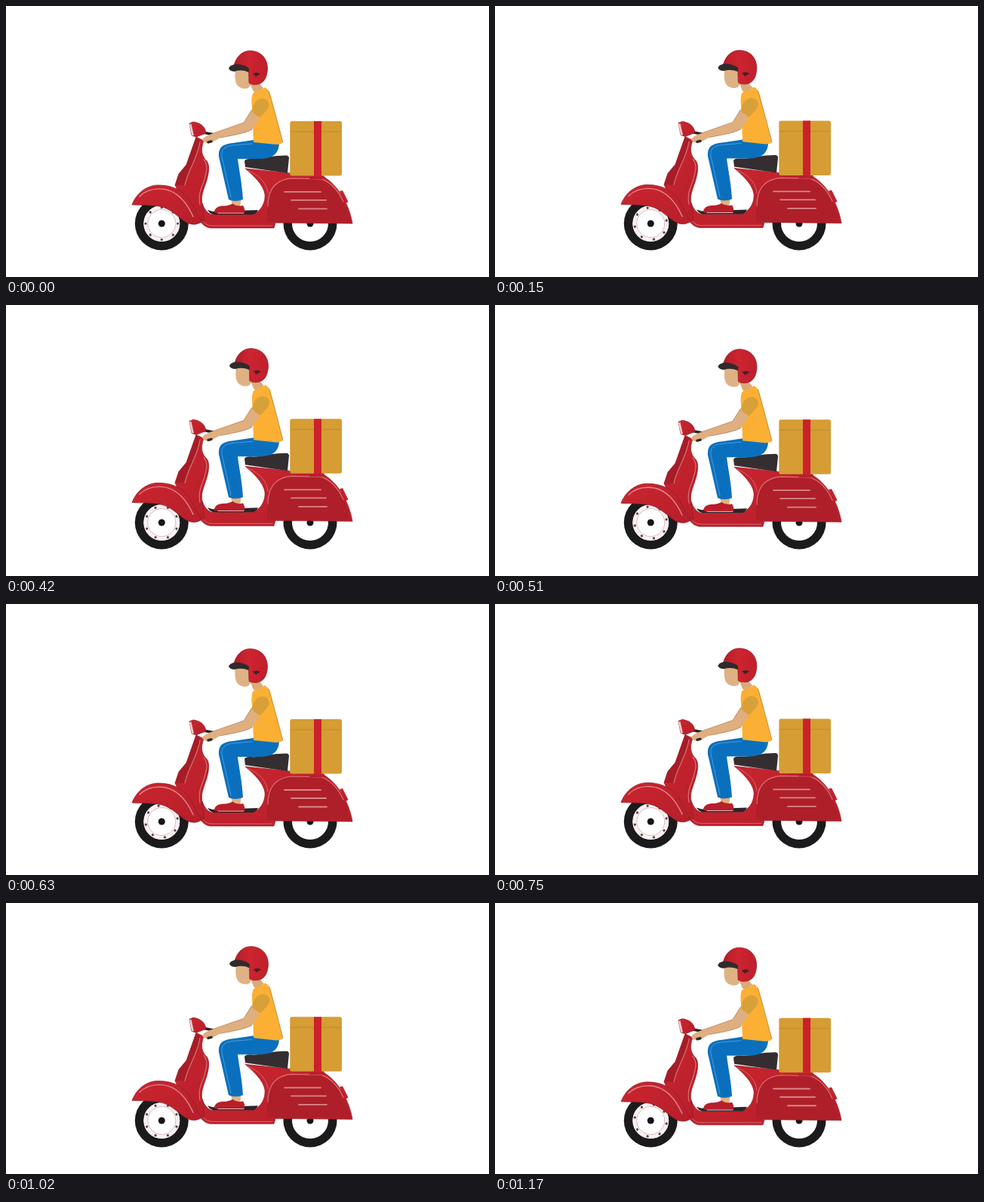
Write an HTML page that moves like this. It is 640 by 360 pixels and loops after 1200 ms.

```html
<!DOCTYPE html>
<html lang="en">
<head>
<meta charset="utf-8">
<title>Scooter delivery</title>
<style>
  html, body { margin: 0; width: 100%; height: 100%; overflow: hidden; background: #fff; }
  svg { display: block; width: 640px; height: 360px; }
  .line { fill: none; stroke-linecap: round; stroke-linejoin: round; }
  .edge { stroke: #8f1c26; stroke-width: .7; stroke-linejoin: round; }
</style>
</head>
<body>
<svg viewBox="0 0 640 360">
  <defs>
    <linearGradient id="red" x1="0" y1="0" x2="1" y2="1">
      <stop offset="0" stop-color="#ca252f"/>
      <stop offset="1" stop-color="#b61f2a"/>
    </linearGradient>
    <linearGradient id="helmet" x1="0" y1="0" x2="1" y2="0">
      <stop offset="0" stop-color="#b51d28"/>
      <stop offset=".45" stop-color="#cd2430"/>
      <stop offset="1" stop-color="#bf1f2b"/>
    </linearGradient>
    <g id="tyre">
      <circle r="35.5" fill="#1b1b1d"/>
      <circle r="24" fill="#fff"/>
      <circle r="4.5" fill="#151517"/>
    </g>
  </defs>

  <g transform="translate(206.3 289)">
    <use href="#tyre"/>
    <circle r="21.2" fill="none" stroke="#f9f0f1" stroke-width="5"/>
    <circle r="18.5" fill="none" stroke="#d3aaad" stroke-width=".8"/>
    <g class="dots" fill="#5a4548"></g>
  </g>
  <use href="#tyre" x="403" y="289"/>

  <g id="bike">
    <!-- rear light, cowl and floor -->
    <path fill="#c2222c" d="M442 246L446 245L453.5 260L450.5 262Z"/>
    <path class="edge" fill="url(#red)" d="M317 216L375 222L421 227C440 238 455 264 459 289L357 288L355 295L271 295C262 294 257 287 253 278L260 262Q264 274 272 277L326 277C339 273 344 260 343 250C341 238 330 227 317 216Z"/>
    <path fill="#ae1f29" d="M346 287C346 266 346 254 350 246C356 234 367 229 380 229L418 230C436 236 449 258 456 287Z"/>
    <path class="line" stroke="#df7077" stroke-width="1.2" d="M347 266C347 242 358 231 378 229L418 230C432 235 441 247 447 260"/>
    <path class="line" stroke="#d6666d" stroke-width="1" d="M321 219C337 225 346 237 347 249M262 287Q265 292 274 292L353 292"/>
    <path class="line" stroke="#d9878b" stroke-width="1.8" d="M369 247H417M378 258H424M388 269.5H425"/>
    <path fill="#2b2527" d="M267 271L274 273L334 271Q331 277 326 277L275 277Q270 276 267 271Z"/>

    <!-- leg shield and steering column -->
    <path class="edge" fill="url(#red)" d="M252 174L262 179C257 192 260 200 266 206Q270 211 268 223C265 240 257 249 260 263L263 285L246 282L224 238L229 223L239 211Z"/>
    <path fill="#a61d27" d="M252 174L257 178C254 200 241 220 237 238L224 238L229 223L239 211Z"/>
    <path class="line" stroke="#da777b" stroke-width="1.1" d="M257 181C254 202 241 218 237 238M262 204C269 213 265 221 263 230C260 241 254 248 257 264"/>

    <!-- front fender -->
    <path class="edge" fill="url(#red)" d="M167 264C173 248 187 238 202 238C224 238 238 248 245 261C250 270 254 279 259 287Q250 293 240 288C229 282 221 271 207 267C195 264 181 265 167 264Z"/>
    <path class="line" stroke="#df8589" stroke-width="1.4" d="M177 253C184 246 193 243 203 243C226 243 239 260 248 280"/>

    <!-- headlamp and handlebar -->
    <path class="line" stroke="#282326" stroke-width="3.5" d="M261 168L274 170.5"/>
    <path class="edge" fill="url(#red)" d="M243 156L248 154C257 155 264 160 265 169L252 174L246 172Z"/>
    <path fill="#efc9ca" d="M243 157L245.5 156.5L249 172L246 172Z"/>

    <!-- parcel -->
    <path fill="#b9202b" d="M405 224H420L424 230H402Z"/>
    <rect x="376.3" y="153" width="68.7" height="72.5" rx="2.5" fill="#d59d34"/>
    <path class="line" stroke="#bd842a" stroke-width=".8" d="M377 167H444"/>
    <rect x="408" y="153" width="10" height="73" fill="#cc212c"/>

    <!-- seat -->
    <path fill="#352e30" d="M316 206Q317 203 323 203C340 204 351 199 360 199L372 198.5Q375 199 375 202L373 222L317 214Z"/>

    <!-- legs -->
    <path fill="#e3b17e" d="M298 256H312L310 267L300 266Z"/>
    <path fill="#b81f2a" d="M276 274C276 268 282 265.5 289 265.5Q296 265 300 262.5Q306 267 314 265Q317 269 316 275H278Z"/>
    <path class="line" stroke="#ead3d1" stroke-width=".9" d="M281 275.2H315"/>
    <path fill="#0a70be" d="M328 178L301 182C287 183 281 188 282 200L295 257Q303 261 314 257C313 237 309 219 307 203L335 203C353 203 361 197 362 183Z"/>
    <path class="line" stroke="#4b9bdb" stroke-width="1" d="M326 183L302 185C289 186 285 191 286 200L298 254"/>

    <g id="torso">
      <path fill="#dcaa78" d="M323 101L336 103L341 109L331 117L327 112Z"/>
      <path fill="#dfb284" d="M304 84C303 91 303 98 305 103C308 109 315 111 321 109L325 104L323 84Z"/>
      <path class="edge" fill="url(#helmet)" d="M302 79C305 67 313 59.5 324 59.5C338 60 346.5 70 346.5 83C346 95 342 102 334 104Q327 105.5 322 102.5L321.5 87Z"/>
      <path fill="#302a2d" d="M295 83Q296 79 303 77.5Q314 77 322 83L321.5 88Q312 84 303 87Q297 87 295 83Z"/>
      <path fill="#45222a" d="M327 90Q332 87 337 90L331 94Z"/>
      <path fill="#fbb034" d="M327 116L331 114Q338 112 343 108Q348 111 350 117L367 181Q365 184 358 184L328 181L326 135C325 128 325 121 327 116Z"/>
      <path class="line" stroke="#b98038" stroke-width=".8" d="M348 113Q354 132 366.8 181"/>
    </g>

    <!-- arm -->
    <path fill="#dfaf80" d="M326 137L338 146C333 153 329 160 326 164Q319 169 284 175L273 181Q263 184 260 178Q262 173 275 169L315 155Z"/>
    <path class="line" stroke="#b98262" stroke-width=".8" d="M275 169L315 155L325 139M284 175Q319 169 326 164"/>
    <path class="line" stroke="#30282b" stroke-width="3.4" d="M268 181L272 180"/>
    <path id="sleeve" fill="#d8a038" d="M333 125Q341 120 347 126Q351 132 345 139L337 148Q330 145 326 140Q326 131 333 125Z"/>
  </g>
</svg>
<script>
  const LOOP = 1200, STEP = 30, BOUNCE = 600;
  const $ = selector => document.querySelector(selector);
  const bike = $('#bike'), torso = $('#torso'), sleeve = $('#sleeve'), dots = $('.dots');

  for (let i = 0; i < 8; i++) {
    dots.innerHTML += `<circle cx="21.3" r="1.6" transform="rotate(${i * 45})"/>`;
  }

  function draw(now) {
    const t = Math.floor(now % LOOP / STEP) * STEP;
    const lift = (1 - Math.cos((t - 40) / BOUNCE * 2 * Math.PI)) / 2;
    const sway = `rotate(${lift * .65} 340 190)`;
    bike.setAttribute('transform', `translate(0 ${-2 * lift})`);
    torso.setAttribute('transform', sway);
    sleeve.setAttribute('transform', sway);
    dots.setAttribute('transform', `rotate(${-t / LOOP * 450})`);
    requestAnimationFrame(draw);
  }
  draw(performance.now());
</script>
</body>
</html>
```
